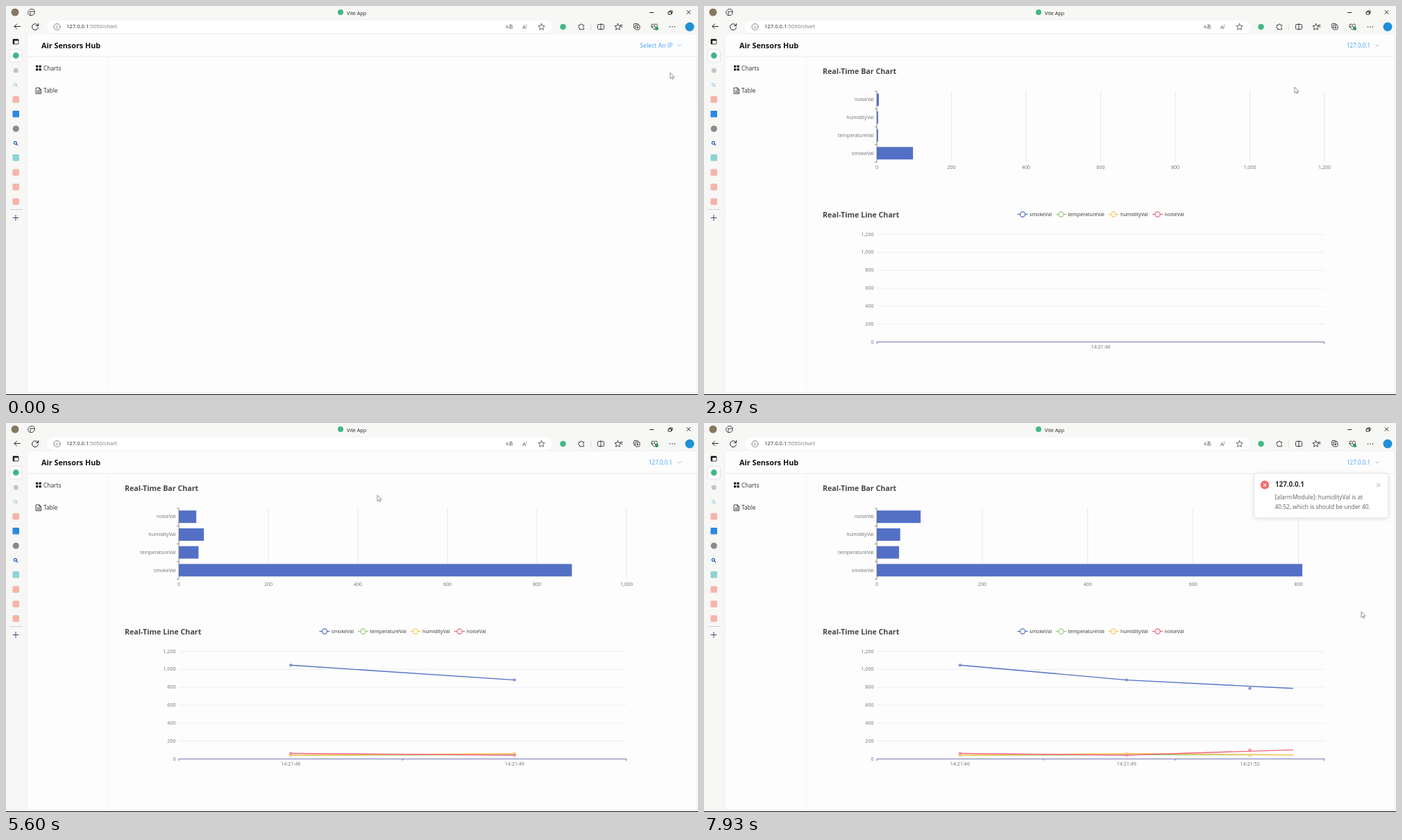
Animation of 997 by 561 pixels, one loop 8000 ms. Source, as an HTML page:

```html
<!DOCTYPE html>
<html lang="en">
<head>
<meta charset="utf-8">
<title>Sensor dashboard</title>
<style>
html, body { margin: 0; width: 100%; height: 100%; overflow: hidden; background: #f7f7f6; }
svg { display: block; width: 100vw; height: 100vh; font-family: "Open Sans", "Noto Sans", sans-serif; }
text { dominant-baseline: central; transform: translateY(-.7px); }
.icon { fill: none; stroke: #333; stroke-width: .9; stroke-linecap: round; stroke-linejoin: round; }
.bold { font-weight: 700; }
.link { fill: #409eff; }
.axis { font-size: 7.1px; fill: #6e7079; }
.mid { text-anchor: middle; }
.end { text-anchor: end; }
.card { fill: #fff; stroke: #e4e7ed; stroke-width: .7; filter: drop-shadow(0 1px 3px #0002); }

.run { animation: 8s linear infinite; }
#pointer { animation-name: move; animation-timing-function: ease-in-out; }
#arrow { animation-name: arrow; animation-timing-function: step-end; }
#hand { animation-name: hand; animation-timing-function: step-end; }
#menu { animation-name: menu; transform-origin: 945px 68px; }
#hover { animation-name: hover; animation-timing-function: step-end; }
#pick { animation-name: pick; animation-timing-function: step-end; }
#before { animation-name: before; animation-timing-function: step-end; }
#after { animation-name: after; animation-timing-function: step-end; }
#alarm { animation-name: alarm; animation-timing-function: ease; }

@keyframes move {
  0%, .8% { transform: translate(957px, 96px); }
  5%, 11.25% { transform: translate(947px, 58px); }
  18%, 29.5% { transform: translate(962px, 104px); }
  35.9% { transform: translate(851px, 117px); animation-timing-function: ease-out; }
  48%, 51% { transform: translate(553px, 97px); }
  54%, 70% { transform: translate(535px, 104px); }
  79.5%, 100% { transform: translate(947px, 272px); }
}
@keyframes arrow { 0% { opacity: 1; } 4.2% { opacity: 0; } 30%, 100% { opacity: 1; } }
@keyframes hand { 0% { opacity: 0; } 4.2% { opacity: 1; } 30%, 100% { opacity: 0; } }
@keyframes menu {
  0%, 7.5% { opacity: 0; transform: scaleY(0); }
  11.25%, 29% { opacity: 1; transform: none; }
  32.5%, 100% { opacity: 0; transform: scaleY(0); }
}
@keyframes hover { 0% { opacity: 0; } 15.6%, 100% { opacity: 1; } }
@keyframes pick { 0% { fill: #606266; } 15.6%, 100% { fill: #409eff; } }
@keyframes before { 0% { opacity: 1; } 29.75%, 100% { opacity: 0; } }
@keyframes after { 0% { opacity: 0; } 29.75%, 100% { opacity: 1; } }
@keyframes alarm {
  0%, 94% { transform: translateX(210px); }
  97.8%, 100% { transform: none; }
}
</style>
</head>
<body>
<svg viewBox="0 0 997 561" preserveAspectRatio="none">
  <defs>
    <clipPath id="plot"><rect x="249" y="320" width="645" height="170"/></clipPath>
    <path id="star" d="M0-4.6 1.4-1.5 4.6-1.2 2.2 1 2.9 4.3 0 2.6-2.9 4.3-2.2 1-4.6-1.2-1.4-1.5Z"/>
    <g id="lens"><circle cx="-.6" cy="-.6" r="2"/><path d="M1 1 2.8 2.8"/></g>
  </defs>

  <rect width="997" height="561" fill="#f7f7f6"/>
  <path d="M30 558V46q0-6 6-6H995V558Z" fill="#fdfdfd" stroke="#ececf0" stroke-width=".8"/>
  <path d="M30 73H995" stroke="#e9e9f0" stroke-width=".9"/>
  <path d="M147.500 73V558" stroke="#f5f5f9" stroke-width=".9"/>
  <rect y="560" width="997" height="1" fill="#111"/>

  <!-- title bar -->
  <circle cx="13" cy="9" r="5.500" fill="#86785f"/>
  <g class="icon">
    <path d="M32 7.500 35 4.500H39L41 7V11L38 13.500H34L32 11ZM35 8H41M35 8V13"/>
    <path d="M927.500 9.500H933M954.500 8.500H958.500V12H954.500ZM956 8.500V7H960V10.500H958.500M981 6.500 986 11.500M986 6.500 981 11.500" stroke="#111"/>
  </g>
  <circle cx="482" cy="9" r="4" fill="#41b883"/>
  <text x="491" y="10.500" font-size="7.3" fill="#222">Vite App</text>

  <!-- toolbar -->
  <rect x="59" y="21" width="728" height="18" rx="9" fill="#fff"/>
  <text x="87" y="30" font-size="7.65" fill="#777"><tspan fill="#222">127.0.0.1</tspan>:5050/chart</text>
  <text x="720" y="30" font-size="7" fill="#555" font-family="Open Sans, Noto Sans CJK JP, sans-serif">aあ</text>
  <text x="744" y="30.500" font-size="8" fill="#555">A<tspan font-size="5" dy="-2">)</tspan></text>
  <g class="icon">
    <path d="M20.500 29.500H12M15.500 26 12 29.500 15.500 33" stroke="#111"/>
    <path d="M46 28A4.500 4.500 0 1 0 46.500 31M46.500 25.500V28.500H43.500" stroke="#111"/>
    <circle cx="73.500" cy="30" r="4.500" stroke="#777"/>
    <path d="M73.500 29.500V32M73.500 27.700V27.800" stroke="#777"/>
    <use href="#star" x="771.500" y="30" stroke="#555"/>
    <path d="M825.500 27.500H827.500A1.500 1.500 0 0 1 830.500 27.500H832.500V29.200A1.500 1.500 0 0 0 832.500 32V33.800H826.500V31.800A1.500 1.500 0 0 1 825.500 29Z"/>
    <path d="M842.500 25V35" stroke="#ddd"/>
    <rect x="852.500" y="26.500" width="9" height="7" rx="1"/><path d="M857 25.500V34.500"/>
    <use href="#star" x="881.500" y="30"/><path d="M885 27.500H888M886 30H888"/>
    <rect x="904.500" y="25.500" width="6.500" height="6.500" rx="1.200"/>
    <rect x="906.500" y="27.500" width="6.500" height="6.500" rx="1.200" fill="#f7f7f6"/><path d="M909.700 29.200V32.300M908.200 30.700H911.300"/>
    <path d="M934 34 930 30Q929 26 932 26Q933.500 26 934 27.500Q935 26 937 26Q939.500 27 938 30Z"/>
    <path d="M930 30H932.500L934 28.500 935 30.500H938"/>
  </g>
  <circle cx="802.500" cy="30" r="4.300" fill="#41b883"/>
  <circle cx="937.500" cy="32.500" r="2.500" fill="#2f9e56"/>
  <path d="M956.500 30h.01M960 30h.01M963.500 30h.01" stroke="#222" stroke-width="1.500" stroke-linecap="round"/>
  <circle cx="985" cy="30" r="6.500" fill="#1f8fd8"/>

  <!-- side tabs -->
  <rect x="5" y="62.500" width="18.500" height="18.500" rx="3.500" fill="#fff" stroke="#dcdce2" stroke-width=".8"/>
  <rect x="10" y="48" width="8" height="7" rx="1" class="icon"/>
  <path d="M10 49H18M11.200 48V55" stroke="#111" stroke-width="1.800"/>
  <circle cx="14.300" cy="71.500" r="4.400" fill="#41b883"/>
  <circle cx="14.300" cy="93" r="3.600" fill="#c4c4c8"/>
  <circle cx="14.300" cy="177" r="4.600" fill="#8a8a8a"/>
  <rect x="9.500" y="151" width="9.500" height="9.500" rx="1" fill="#2a88e6"/>
  <rect x="9.500" y="214" width="9.500" height="9.500" rx="1" fill="#8fd3d3"/>
  <g fill="#f6b3aa">
    <rect x="9.500" y="130" width="9.500" height="9.500" rx="1.500"/>
    <rect x="9.500" y="235.300" width="9.500" height="9.500" rx="1.500"/>
    <rect x="9.500" y="256.300" width="9.500" height="9.500" rx="1.500"/>
    <rect x="9.500" y="277.300" width="9.500" height="9.500" rx="1.500"/>
  </g>
  <g class="icon">
    <use href="#lens" x="14" y="114" stroke="#8cc3e0"/>
    <use href="#lens" x="14" y="198" stroke="#1d58b8" stroke-width="1.200"/>
    <path d="M6 293.500H23" stroke="#c9c9e6"/>
    <path d="M10 305.500H18M14 301.500V309.500" stroke="#333a70"/>
  </g>

  <!-- page header and navigation -->
  <text x="51" y="57.500" font-size="10.8" class="bold" fill="#111">Air Sensors Hub</text>
  <path d="M43 85.500h3.300v3.300H43ZM47.500 85.500h3.300v3.300h-3.300ZM43 90h3.300v3.300H43ZM47.500 90h3.300v3.300h-3.300Z" fill="#222"/>
  <text x="54" y="90" font-size="8.4" fill="#303133">Charts</text>
  <path class="icon" d="M43.500 118H48L50.500 120.500V126.500H43.500ZM48 118V120.500H50.500M45 122.500H49M45 124.500H49"/>
  <text x="54" y="122.500" font-size="8.4" fill="#303133">Table</text>
  <text id="before" class="run link" x="913.500" y="57.500" font-size="8.7">Select An IP</text>
  <text id="after" class="run link" x="926" y="57.500" font-size="8.05">127.0.0.1</text>
  <path d="M967.500 55.500 970 58 972.500 55.500" fill="none" stroke="#8cb8ea" stroke-width=".9"/>

  <g id="charts"></g>

  <g id="menu" class="run" font-size="8.2" fill="#606266">
    <rect class="card" x="905" y="67.500" width="79" height="101" rx="2.500"/>
    <rect id="hover" class="run" x="905.500" y="91" width="78" height="18.500" fill="#e3f3ff"/>
    <text x="915" y="81.500">192.168.191.62</text>
    <text x="915" y="100" id="pick" class="run">127.0.0.1</text>
    <text x="915" y="119">192.168.65.128</text>
    <text x="915" y="137.500">192.168.80.221</text>
    <text x="915" y="156.500">192.168.80.206</text>
  </g>

  <g id="alarm" class="run">
    <rect class="card" x="793" y="73" width="192.500" height="63.500" rx="4"/>
    <circle cx="808" cy="89.300" r="6.200" fill="#f56c6c"/>
    <path d="M806 87.300 810 91.300M810 87.300 806 91.300" stroke="#fff" stroke-width="1.100"/>
    <text x="823" y="89.500" font-size="9.8" class="bold" fill="#303133">127.0.0.1</text>
    <path d="M969 86.800 974.500 92.300M974.500 86.800 969 92.300" stroke="#a0a3a9" stroke-width=".9"/>
    <g font-size="8.4" fill="#606266">
      <text x="822.500" y="107">[alarmModule]: humidityVal is at</text>
      <text x="822.500" y="121">40.52, which is should be under 40.</text>
    </g>
  </g>

  <g id="pointer" class="run" fill="#fff" stroke="#777" stroke-width=".8" stroke-linejoin="round">
    <path id="arrow" class="run" d="M0 0V8.500L2 6.700 3.300 9.500 4.600 8.900 3.400 6.200H6Z"/>
    <path id="hand" class="run" d="M-1 1Q0-.5 1 1V4L4.500 5V8L3.500 10.500H-.5L-3.500 6.500Q-3 5-1 6.500Z"/>
  </g>
</svg>

<script>
const LOOP = 8000, LEFT = 249, WIDTH = 645, BASE = 484, HEIGHT = 155;
const names = ["smokeVal", "temperatureVal", "humidityVal", "noiseVal"];
const colors = ["#5470c6", "#91cc75", "#fac858", "#ee6680"];
const samples = [
  { at: 2838, label: "14:21:46", max: 1200, values: [1043, 36, 37, 58] },
  { at: 4713, label: "14:21:49", max: 1000, values: [878, 44, 56, 39] },
  { at: 7746, label: "14:21:52", max: 800, values: [784, 41.5, 40.52, 97.5] }
];
const BAR_LAG = 9;

const clamp = x => Math.min(1, Math.max(0, x));
const lerp = (a, b, p) => a + (b - a) * p;
const cubicOut = x => 1 - (1 - x) ** 3;
const cubicInOut = x => x < .5 ? 4 * x ** 3 : 1 - 4 * (1 - x) ** 3;
const text = (x, y, s, cls = "axis", extra = "") => `<text x="${x}" y="${y}" class="${cls}" ${extra}>${s}</text>`;
const path = (d, color, w = .8) => `<path d="${d}" fill="none" stroke="${color}" stroke-width="${w}"/>`;
const ring = (x, y, r, color, alpha = 1) =>
  `<circle cx="${x}" cy="${y}" r="${r}" fill="#fff" stroke="${color}" stroke-width="1.2" opacity="${alpha}"/>`;
const title = (y, s) => text(171, y, s, "bold", 'font-size="10.7" fill="#464646"');

const valueY = v => BASE - v / 1200 * HEIGHT;
const slotX = (i, n) => LEFT + WIDTH * (i + .5) / n;

function barChart(k, p) {
  const now = samples[k], old = samples[k - 1];
  const place = (v, oldV = v) => LEFT + WIDTH * (old ? lerp(oldV / old.max, v / now.max, p) : v / now.max);
  let out = title(94.5, "Real-Time Bar Chart");
  for (let v = 0; v <= now.max; v += 200) {
    const x = place(v);
    if (v) out += path(`M${x} 123V225`, "#e0e3f2");
    out += text(x, 233, v.toLocaleString("en-US"), "axis mid");
  }
  names.forEach((name, i) => {
    const y = 212.3 - i * 25.7, v = now.values[i];
    const end = old ? place(v, old.values[i]) : lerp(LEFT, place(v), p);
    out += `<rect x="${LEFT}" y="${y - 9}" width="${end - LEFT}" height="18" fill="${colors[0]}"/>`;
    out += text(244.5, y, name, "axis end");
  });
  let axis = "M249 123V225.5";
  for (let i = 0; i < 5; i++) axis += `M246 ${123 + i * 25.6}H249`;
  return out + path(axis, "#6e7079");
}

function lineChart(k, p, since) {
  const n = k + 1, fade = k ? clamp(since / 100) : clamp((since - 480) / 150);
  const moved = i => lerp(slotX(i, k), slotX(i, n), p);
  const tipX = k && lerp(k === 1 ? slotX(0, 1) : slotX(k, k), slotX(k, n), p);
  let out = title(301.5, "Real-Time Line Chart");

  [459, 514.5, 590, 653.5].forEach((x, i) => {
    out += path(`M${x - 7.5} 300.5h15`, colors[i], 1.3) + ring(x, 300.5, 3.6, colors[i]);
    out += text(x + 10, 300.5, names[i], "", 'font-size="7.2" fill="#333"');
  });
  for (let v = 0; v <= 1200; v += 200) {
    if (v) out += path(`M249 ${valueY(v) + .5}H894`, "#e0e6f1", .65);
    out += text(244.5, valueY(v) + .3, v.toLocaleString("en-US"), "axis end");
  }

  let axis = "M249 484.5H894M249 484V487.500M893.500 484V487.500";
  for (let i = 1; i < n; i++) {
    const to = LEFT + WIDTH * i / n;
    axis += `M${i < k ? lerp(LEFT + WIDTH * i / k, to, p) : to} 484V487`;
  }
  out += path(axis, "#7678b0", 1);
  samples.slice(0, n).forEach((s, i) => {
    out += text(i < k ? moved(i) : slotX(i, n), 491.8, s.label, "axis mid", i === k && k ? `opacity="${fade}"` : "");
  });

  names.forEach((_, s) => {
    const ys = samples.slice(0, n).map(row => valueY(row.values[s]));
    const line = ys.map((y, i) => `${i < k ? moved(i) : tipX} ${y}`).join("L");
    if (k) out += `<g clip-path="url(#plot)">${path("M" + line, colors[s], 1.4)}</g>`;
    ys.forEach((y, i) => {
      out += ring(i < k ? moved(i) : slotX(i, n), y, 1.4, colors[s], i < k ? 1 : fade);
    });
  });
  return out;
}

const charts = document.getElementById("charts");
let start;

function draw(now) {
  start ??= now;
  const t = (now - start) % LOOP;
  const k = samples.filter(s => s.at <= t).length - 1;
  if (k < 0) {
    charts.innerHTML = "";
  } else {
    const since = t - samples[k].at;
    const ease = ms => k ? cubicInOut(clamp(ms / 300)) : cubicOut(clamp(ms / 1000));
    charts.innerHTML = barChart(k, ease(k ? since - BAR_LAG : since)) + lineChart(k, ease(since), since);
  }
  requestAnimationFrame(draw);
}
requestAnimationFrame(draw);
</script>
</body>
</html>
```
